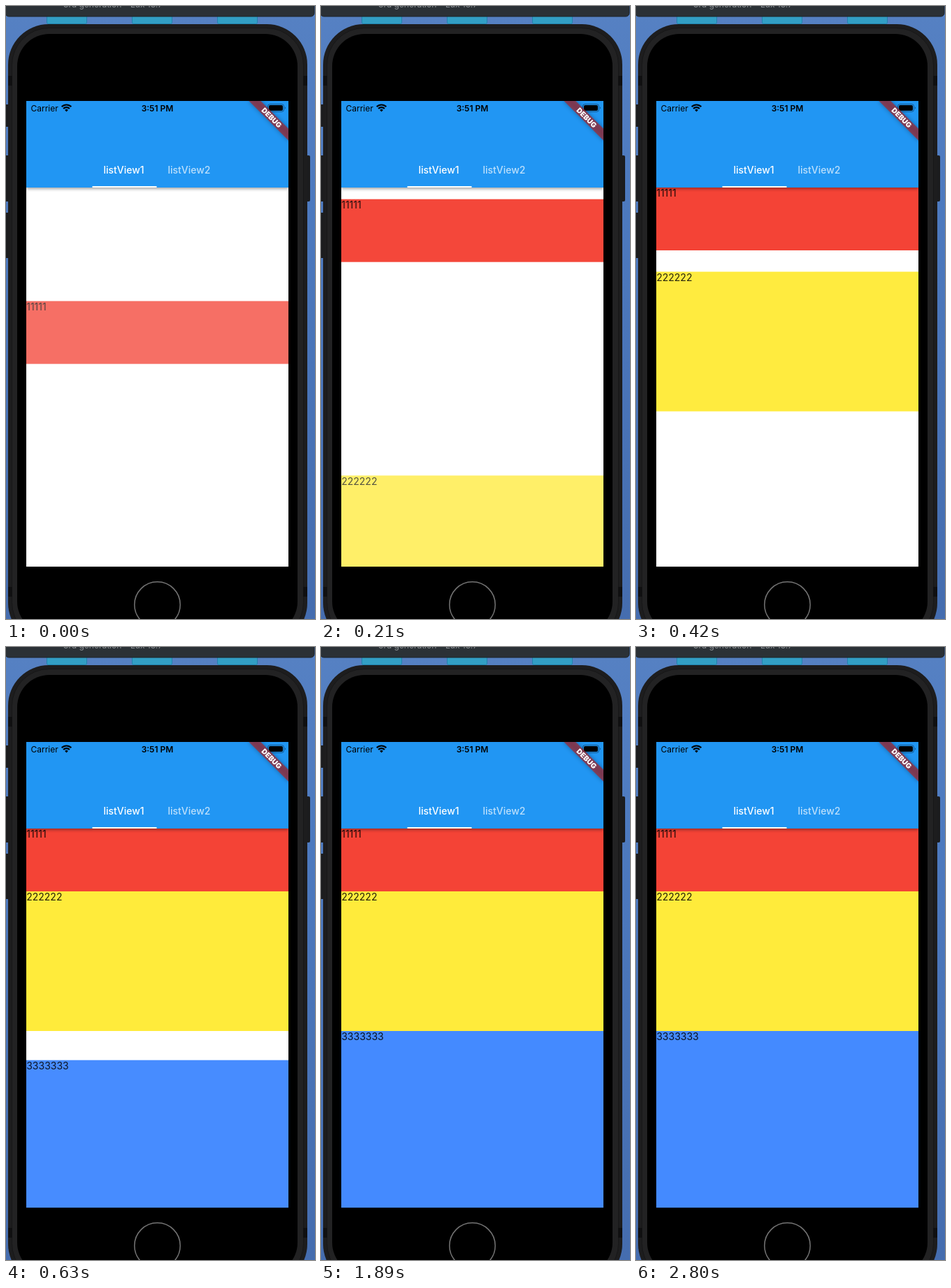
These frames come from a looping animation (442 px wide and 878 px high, 2.87 s). An HTML page:

```html
<!DOCTYPE html>
<html lang="en">
<head>
<meta charset="utf-8">
<title>Staggered list</title>
<style>
  html, body { margin: 0; width: 100%; height: 100%; overflow: hidden; background: #4a76b8; }
  svg { display: block; }
  text { font: 14px Inter, "Open Sans", sans-serif; }
  .status { font-size: 12px; }
  .tab { font-weight: 500; fill: #fff; }
  .cell text { fill: #000; fill-opacity: .87; }
</style>
</head>
<body>
<svg width="442" height="878" viewBox="0 0 442 878">
  <defs>
    <linearGradient id="desk" x2="0" y2="1">
      <stop stop-color="#5681c3"/>
      <stop offset=".3" stop-color="#4d7abf"/>
      <stop offset="1" stop-color="#456daf"/>
    </linearGradient>
    <clipPath id="screen"><path d="M29 136h375v667H29z"/></clipPath>
  </defs>
  <rect width="442" height="878" fill="url(#desk)"/>

  <!-- desktop behind the phone -->
  <g fill="#329fc5" stroke="#2182ad">
    <rect x="58.500" y="8.500" width="57" height="17" rx="2"/>
    <rect x="180.500" y="8.500" width="57" height="17" rx="2"/>
    <rect x="302.500" y="8.500" width="57" height="17" rx="2"/>
  </g>
  <rect x="-1" y="-20" width="442" height="35" rx="5" fill="#2b3136" stroke="#1c2227"/>
  <text class="status" x="82" y="2" fill="#8d9296">3rd generation – Lux 13.7</text>

  <!-- phone body -->
  <g fill="#1b1c1e">
    <rect x="-3" y="141" width="8" height="32" rx="2"/>
    <rect x="-3" y="214" width="8" height="66" rx="2"/>
    <rect x="-3" y="296" width="8" height="65" rx="2"/>
    <rect x="428" y="214" width="7" height="66" rx="2"/>
  </g>
  <rect x="3" y="26" width="428" height="887" rx="58" fill="#1d1d1e"/>
  <rect x="8.500" y="31.500" width="417" height="876" rx="53" fill="#222223" stroke="#171718"/>
  <path d="M3 100h6v14H3zM425 100h6v14h-6zM3 832h6v14H3zM425 832h6v14h-6z" fill="#101011"/>
  <rect x="16" y="40" width="401" height="859" rx="46"/>
  <circle cx="216.500" cy="857.500" r="32.700" fill="none" stroke="#737373" stroke-width="1.500"/>

  <g clip-path="url(#screen)">
    <rect x="29" y="136" width="375" height="667" fill="#fff"/>
    <g id="list"></g>

    <rect x="29" y="100" width="375" height="160" fill="#2196f3"
          style="filter: drop-shadow(0 2px 2px rgba(0,0,0,.36))"/>
    <text class="tab" x="139.500" y="239.500">listView1</text>
    <text class="tab" x="231.500" y="239.500" fill-opacity=".7">listView2</text>
    <rect x="123.500" y="258" width="92" height="2" fill="#fff"/>

    <text class="status" x="35.500" y="150.500">Carrier</text>
    <text class="status" x="216.500" y="150.500" text-anchor="middle" font-weight="600" style="font-weight:600">3:51 PM</text>
    <g fill="none" stroke="#000" stroke-width="2.200">
      <path d="M79.700 144.300a9.600 9.600 0 0 1 13.600 0M82.100 147a6.200 6.200 0 0 1 8.800 0"/>
      <path d="M86.500 151.500l-2.300-2.500a3.200 3.200 0 0 1 4.600 0z" fill="#000" stroke="none"/>
    </g>
    <rect x="374.500" y="140.500" width="23" height="11" rx="3.200" fill="none" stroke="#000" stroke-opacity=".4"/>
    <rect x="376" y="142" width="20" height="8" rx="2"/>
    <path d="M399 144.300q2 1.700 0 3.400z" fill-opacity=".45"/>

    <g transform="translate(404 136) rotate(45)">
      <rect x="-40" y="28" width="80" height="12" fill="#b71c1c" fill-opacity=".63"
            style="filter: drop-shadow(0 0 3px rgba(0,0,0,.5))"/>
      <text y="37.700" text-anchor="middle" fill="#fff" style="font-size:10.200px;font-weight:900">DEBUG</text>
    </g>
  </g>
</svg>
<script>
const LOOP = 2870, STEP = 70;
const FIRST_END = 234, STAGGER = 208, FADE = 1000, SPEED = 0.695;

const items = [
  { y: 260, h: 90, color: '#f44336', label: '11111' },
  { y: 350, h: 200, color: '#ffeb3b', label: '222222' },
  { y: 550, h: 300, color: '#448aff', label: '3333333' },
];
const list = document.getElementById('list');
list.innerHTML = items.map(({ h, color, label }) =>
  `<g class="cell"><rect x="29" width="375" height="${h}" fill="${color}"/><text x="29.2" y="13.3">${label}</text></g>`
).join('');

// Each item slides up and fades in linearly; lower items travel faster.
function draw(t) {
  items.forEach(({ y }, i) => {
    const left = Math.max(0, FIRST_END + STAGGER * i - t);
    const cell = list.children[i];
    cell.setAttribute('transform', `translate(0 ${y + left * SPEED * (i + 1)})`);
    cell.setAttribute('opacity', 1 - left / FADE);
  });
}

const start = performance.now();
function tick() {
  const t = (performance.now() - start) % LOOP;
  draw(Math.floor(t / STEP) * STEP);
  requestAnimationFrame(tick);
}
tick();
</script>
</body>
</html>
```
